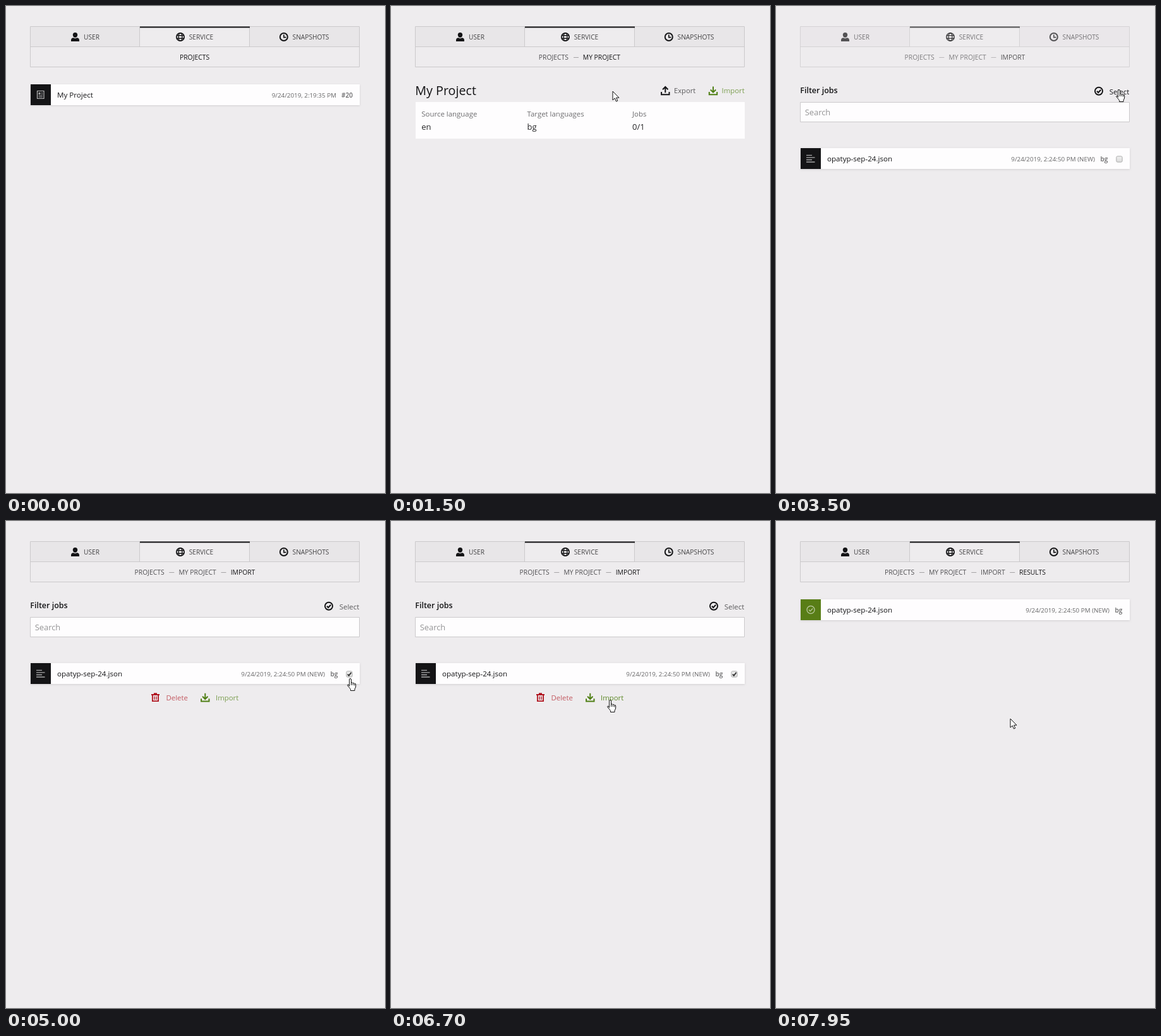
Write an HTML page with a canvas that moves like this. It is 600 px wide and 771 px high and loops after 8 s.

```html
<!DOCTYPE html>
<html lang="en">
<head>
<meta charset="utf-8">
<title>Project import</title>
<style>
html, body { margin: 0; width: 100%; height: 100%; overflow: hidden; background: #eeecee; }
canvas { display: block; width: 600px; height: 771px; }
</style>
</head>
<body>
<canvas id="stage"></canvas>
<script>
const W = 600, H = 771, LOOP = 8000;
const BG = '#eeecee', INK = '#141416', GREEN = '#4f7f14', RED = '#b0141f', LINE = '#cbc9cb';
const FONT = '"Open Sans", "Noto Sans", sans-serif';
const canvas = document.getElementById('stage');
const ratio = window.devicePixelRatio || 1;
canvas.width = W * ratio;
canvas.height = H * ratio;
const ctx = canvas.getContext('2d', { alpha: false });

const clamp = v => Math.min(1, Math.max(0, v));
const ramp = (t, from, to) => clamp((t - from) / (to - from));
const smooth = v => v * v * (3 - 2 * v);

function withAlpha(alpha, paint) {
  ctx.save();
  ctx.globalAlpha *= alpha;
  paint();
  ctx.restore();
}

function text(str, x, y, size, { alpha = 1, color = INK, weight = 400, align = 'left' } = {}) {
  withAlpha(alpha, () => {
    ctx.font = `${weight} ${size}px ${FONT}`;
    ctx.textAlign = align;
    ctx.fillStyle = color;
    ctx.fillText(str, x, y);
  });
}

function rect(x, y, w, h, color) {
  ctx.fillStyle = color;
  ctx.fillRect(x, y, w, h);
}

function stroke(d, color, width = 2) {
  ctx.strokeStyle = color;
  ctx.lineWidth = width;
  ctx.stroke(new Path2D(d));
}

function ring(x, y, rx, ry, color, width) {
  ctx.beginPath();
  ctx.ellipse(x, y, rx, ry, 0, 0, Math.PI * 2);
  ctx.strokeStyle = color;
  ctx.lineWidth = width;
  ctx.stroke();
}

function card(y, h) {
  ctx.save();
  ctx.shadowColor = 'rgba(0,0,0,.12)';
  ctx.shadowBlur = 3 * ratio;
  ctx.shadowOffsetY = ratio;
  rect(39, y, 521, h, '#fefdfe');
  ctx.restore();
}

// Icons
function userIcon() {
  ctx.fillStyle = INK;
  ctx.fill(new Path2D('M109.5 42C112.2 42 113.4 43.8 113.2 46C113 48.4 111.4 50 109.5 50C107.6 50 106 48.4 105.8 46C105.6 43.8 106.8 42 109.5 42Z M103 56V54Q103 51 106.5 50.3Q109.5 52.3 112.5 50.3Q116 51 116 54V56Z'));
}

function globeIcon() {
  ring(276, 49, 6.2, 6.2, INK, 1.7);
  ring(276, 49, 2.9, 6.2, INK, 1.4);
  stroke('M270 46.8H282M270 51.2H282', INK, 1.4);
}

function clockIcon() {
  ring(439.8, 49, 6, 6, INK, 2);
  stroke('M439.8 45.3V49.6H443.4', INK, 1.6);
}

function checkIcon(x, y, color, width) {
  ring(x, y, 6, 6, color, width);
  stroke(`M${x - 3} ${y}l2.2 2.3l4 -4.3`, color, width);
}

function trayIcon(x, y, color, down) {
  stroke(`M${x - 6.2} ${y + 2}v4.3h12.4v-4.3`, color);
  stroke(down ? `M${x} ${y - 6.5}v9M${x - 4.2} ${y - 1.5}l4.2 4.2l4.2 -4.2`
              : `M${x} ${y + 3.2}v-9M${x - 4.2} ${y - 1.8}l4.2 -4.2l4.2 4.2`, color);
}

function trashIcon(x, y) {
  stroke(`M${x - 6.5} ${y - 4.5}h13M${x - 2.5} ${y - 6.3}h5M${x - 4.6} ${y - 4}v9.7h9.2v-9.7`, RED, 1.8);
  stroke(`M${x - 1.5} ${y - 2}v5.5M${x + 1.5} ${y - 2}v5.5`, RED, 1.3);
}

function documentIcon(y) {
  stroke(`M49.5 ${y - 6}h10.5v12h-10.5z`, '#b9b9ba', 1.2);
  stroke(`M51.5 ${y + 1.5}h6.5M51.5 ${y + 3.7}h6.5M56 ${y - 3}h2M56 ${y - .8}h2`, '#a3a3a5', 1);
  rect(51.5, y - 3.7, 3, 3.4, '#a3a3a5');
}

function linesIcon(y) {
  stroke(`M48 ${y - 5.3}h9M48 ${y - 1.8}h13.5M48 ${y + 1.8}h9M48 ${y + 5.3}h13.5`, '#a9a9ab', 1.3);
}

// Page parts
function header(crumbs, dashes) {
  rect(39, 33, 172, 31, '#e8e6e8');
  rect(386, 33, 173, 31, '#e8e6e8');
  stroke('M38.5 32.5H559.5V96.5H38.5ZM38.5 64.5H559.5M211.5 33V64M385.5 33V64', LINE, 1);
  rect(212, 32.5, 174, 2, INK);
  userIcon();
  globeIcon();
  clockIcon();
  text('USER', 123, 53, 10.2, { alpha: .78 });
  text('SERVICE', 289.7, 53, 10.2, { alpha: .78 });
  text('SNAPSHOTS', 453.6, 53, 10.2, { alpha: .78 });
  crumbs.forEach(([label, x], i) =>
    text(label, x, 84.8, 10.35, { alpha: i === crumbs.length - 1 ? 1 : .72 }));
  for (const x of dashes) stroke(`M${x} 81.5h8`, '#a5a3a5', 1);
}

function row(y, name, date, dateRight, tag, tagX) {
  card(y, 33);
  rect(39, y, 32, 33, INK);
  text(name, 81, y + 21, 11.6);
  text(date, dateRight, y + 20.7, 9.85, { alpha: .65, align: 'right' });
  text(tag, tagX, y + 20.7, 10, { alpha: .65, weight: 600 });
}

function projectsPage() {
  row(124, 'My Project', '9/24/2019, 2:19:35 PM', 523, '#20', 531);
  documentIcon(140.5);
}

function projectPage(t) {
  text('My Project', 38.3, 141, 19.7);
  trayIcon(434.3, 134, INK, false);
  text('Export', 448, 138, 11.2, { alpha: .68 });
  trayIcon(510, 134, GREEN, true);
  text('Import', 523.6, 138, 11.35, { color: GREEN, alpha: .72 + .28 * ramp(t, 2900, 3000) });
  rect(39, 152, 521, 58, '#fefdfe');
  [['Source language', 'en', 48.3], ['Target languages', 'bg', 215.6], ['Jobs', '0/1', 382]]
    .forEach(([label, value, x]) => {
      text(label, x, 175, 11.45, { alpha: .62 });
      text(value, x, 196.3, 13, { alpha: .92 });
    });
}

function checkbox(checked) {
  const shade = ctx.createLinearGradient(0, 238, 0, 248);
  shade.addColorStop(0, '#f0f0f0');
  shade.addColorStop(1, '#d9d9d9');
  ctx.beginPath();
  ctx.roundRect(538.9, 237.9, 9.2, 9.2, 1.8);
  ctx.fillStyle = shade;
  ctx.fill();
  ctx.strokeStyle = '#aaa';
  ctx.lineWidth = 1;
  ctx.stroke();
  if (checked) stroke('M540.8 242.6L542.8 244.7L546.6 239.7', '#333', 1.9);
}

function importPage(t) {
  text('Filter jobs', 38.3, 137.6, 12.5, { weight: 600 });
  checkIcon(511, 134.7, INK, 2);
  text('Select', 527.7, 139.5, 11.45, { alpha: 1 - .32 * ramp(t, 3990, 4140) });
  rect(39, 152, 520, 32, '#fefdfe');
  stroke('M38.5 152.5H559.5V183.5H38.5Z', LINE, 1);
  text('Search', 45.7, 173, 12.9, { alpha: .45 });
  row(225, FILE, NEW_DATE, 505, 'bg', 513.5);
  linesIcon(241.7);
  checkbox(t >= 4900);
  withAlpha(ramp(t, 4850, 5000), () => {
    trashIcon(236.5, 279.5);
    text('Delete', 253.5, 284, 11.4, { color: RED, alpha: .68 });
    trayIcon(315.3, 279.3, GREEN, true);
    text('Import', 332, 284, 11.35, { color: GREEN, alpha: .72 + .28 * ramp(t, 6600, 6750) });
  });
}

function resultsPage(t) {
  row(124, FILE, NEW_DATE, 528, 'bg', 536.5);
  const done = ramp(t, 7350, 7600);
  if (done < 1) linesIcon(140.5);
  withAlpha(done, () => {
    rect(39, 124, 32, 33, '#587d16');
    checkIcon(55, 140.5, '#b3c496', 1.4);
  });
}

const FILE = 'opatyp-sep-24.json', NEW_DATE = '9/24/2019, 2:24:50 PM (NEW)';
const inside = (x, y, l, t, r, b) => x >= l && x <= r && y >= t && y <= b;

const pages = [
  { start: 0, paint: projectsPage, crumbs: [['PROJECTS', 275]], dashes: [],
    hot: (x, y) => inside(x, y, 39, 124, 560, 157) },
  { start: 1500, paint: projectPage, crumbs: [['PROJECTS', 233.8], ['MY PROJECT', 303.8]], dashes: [289],
    hot: (x, y) => inside(x, y, 502, 127, 560, 143) },
  { start: 3400, paint: importPage,
    crumbs: [['PROJECTS', 203.6], ['MY PROJECT', 273.5], ['IMPORT', 355.7]], dashes: [258.3, 340.5],
    hot: (x, y) => inside(x, y, 503, 127, 560, 143) || inside(x, y, 39, 225, 560, 258)
      || inside(x, y, 308, 272, 369, 290) },
  { start: 6850, paint: resultsPage,
    crumbs: [['PROJECTS', 172], ['MY PROJECT', 242], ['IMPORT', 324], ['RESULTS', 385]],
    dashes: [227, 309.3, 370.2], hot: (x, y) => inside(x, y, 39, 124, 560, 157) }
];

// Pointer: start, end, then from, control and to points of each curve
const moves = [
  [600, 1350, [598, 331], [465, 215], [351, 135]],
  [2300, 2800, [351, 135], [440, 167], [543, 132]],
  [3950, 4450, [543, 132], [564, 190], [545, 249]],
  [5950, 6700, [545, 249], [440, 396], [347, 283]],
  [7350, 7600, [347, 283], [358, 305], [369, 316]],
  [7850, 7950, [369, 316], [371, 316], [371, 313]]
];
const HAND = new Path2D('M3.5 12.5V2Q3.5 .5 5 .5Q6.5 .5 6.5 2V7Q9 6.3 9.3 7.7Q11.5 7 11.8 8.5Q13.7 8 13.7 10V13Q13.5 15 12 17V19.5H5.5V17.5Q4.5 15.5 1 12Q0 10 1.8 10Q3 10.5 3.5 12.5ZM6.5 7V11M9.2 8V11M11.7 9V11.5');
const ARROW = new Path2D('M0 0V14L3.3 11L5.5 16L7.8 15L5.6 10.2H10Z');

function pointer(t, page) {
  const move = moves.filter(m => t >= m[0]).pop();
  if (!move) return;
  const [start, end, a, b, c] = move;
  const p = smooth(ramp(t, start, end)), q = 1 - p;
  const [x, y] = [0, 1].map(i => q * q * a[i] + 2 * q * p * b[i] + p * p * c[i]);
  const hand = page.hot(x, y) && !(t >= 1500 && t < 2300);
  const shape = hand ? HAND : ARROW;
  ctx.save();
  ctx.translate(Math.round(x) - (hand ? 5 : 0), Math.round(y));
  ctx.fillStyle = '#fff';
  ctx.fill(shape);
  ctx.strokeStyle = '#111';
  ctx.lineWidth = 1;
  ctx.stroke(shape);
  ctx.restore();
}

function headerAlpha(t) {
  const first = ramp(t, 3300, 3400) - ramp(t, 3450, 3600);
  const second = ramp(t, 6800, 6950) - ramp(t, 7350, 7600);
  return 1 - .45 * (first + second);
}

function draw(t) {
  ctx.setTransform(ratio, 0, 0, ratio, 0, 0);
  rect(0, 0, W, H, BG);
  const page = pages.filter(p => t >= p.start).pop();
  withAlpha(headerAlpha(t), () => header(page.crumbs, page.dashes));
  page.paint(t);
  pointer(t, page);
}

const begin = performance.now();
function tick() {
  draw((performance.now() - begin) % LOOP);
  requestAnimationFrame(tick);
}
tick();
</script>
</body>
</html>
```
